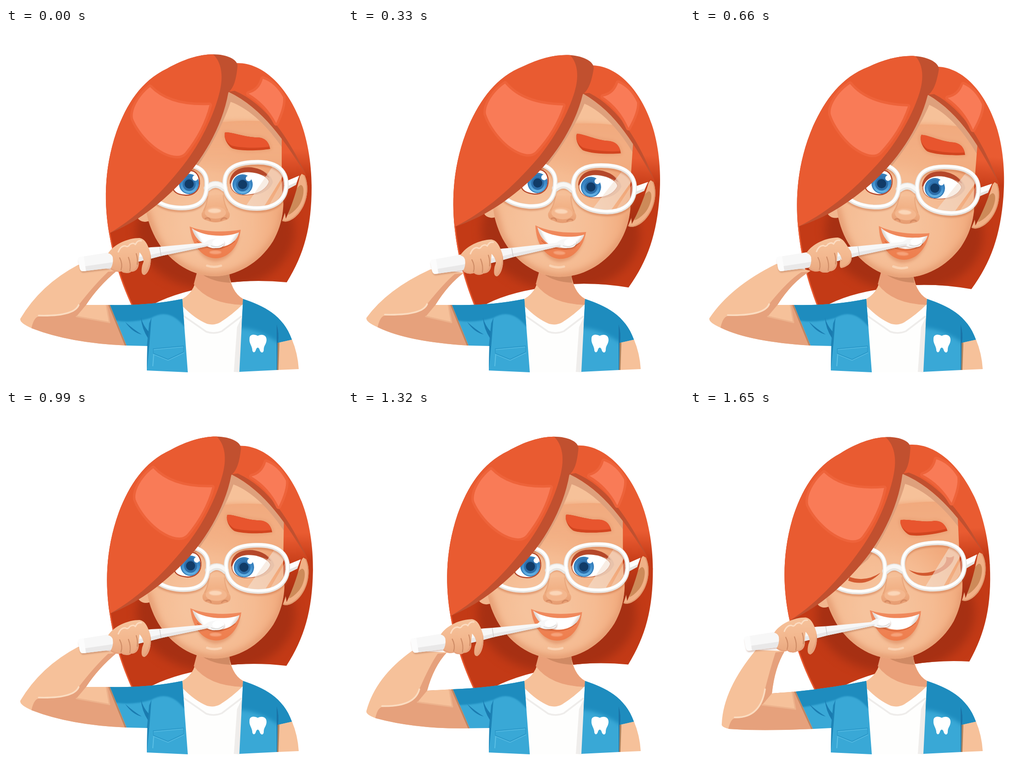
An HTML page with a canvas that plays this animation: 730x767 px, repeating every 1.98 s.

```html
<!DOCTYPE html>
<html lang="en">
<head>
<meta charset="utf-8">
<title>Brushing teeth</title>
<style>
html, body { margin: 0; width: 100%; height: 100%; overflow: hidden; background: #fff; }
canvas { display: block; width: 730px; height: 767px; }
</style>
</head>
<body>
<canvas id="stage" width="730" height="767"></canvas>
<script>
const ctx = document.getElementById('stage').getContext('2d');
const STEP = 330;
const SKIN = '#f6c19a', SKIN_DARK = '#e6a17c', HAIR = '#e95b31', HAIR_DARK = '#c1502f';
const HAIR_BACK = '#c33a16', HAIR_LIGHT = '#f97b57', BLUE = '#39a8d6', BLUE_DARK = '#1e8cbe';

function fill(d, color) {
  ctx.fillStyle = color;
  ctx.fill(new Path2D(d));
}

function line(d, color, width) {
  ctx.strokeStyle = color;
  ctx.lineWidth = width;
  ctx.lineCap = ctx.lineJoin = 'round';
  ctx.stroke(new Path2D(d));
}

function oval(x, y, rx, ry, color, turn = 0) {
  ctx.fillStyle = color;
  ctx.beginPath();
  ctx.ellipse(x, y, rx, ry, turn, 0, Math.PI * 2);
  ctx.fill();
}

function addStops(g, stops) {
  stops.forEach((c, i) => g.addColorStop(i / (stops.length - 1), c));
  return g;
}
const linear = (x0, y0, x1, y1, ...stops) => addStops(ctx.createLinearGradient(x0, y0, x1, y1), stops);
const radial = (x, y, r0, r1, ...stops) => addStops(ctx.createRadialGradient(x, y, r0, x, y, r1), stops);

function group(draw) {
  ctx.save();
  draw();
  ctx.restore();
}

function clipped(d, draw) {
  group(() => { ctx.clip(new Path2D(d)); draw(); });
}

function soft(px, draw) {
  group(() => { ctx.filter = `blur(${px}px)`; draw(); });
}

// Turn around a pivot, then move the pivot to (x, y).
function place(px, py, x, y, deg) {
  ctx.translate(x, y);
  ctx.rotate(deg * Math.PI / 180);
  ctx.translate(-px, -py);
}

// arm: wrist, outer bend, elbow, underside, crook, inner bend, wrist, inner fold (x, y each)
const armOut = [157,513, 75,556, 31,630, 140,683, 174,600, 200,560, 242,525, 158,600];
const armIn = [179,523, 85,566, 40,628, 130,680, 190,600, 218,555, 252,530, 172,598];
const armFar = [188,511, 88,560, 42,629, 130,680, 190,600, 222,550, 262,526, 172,598];
const armBack = [139,522, 60,578, 40,652, 150,692, 172,608, 186,556, 215,525, 155,605];
const armDown = [143,520, 72,605, 69,680, 150,696, 178,614, 184,558, 206,522, 163,605];

// head: pivot x, y, degrees; hand: dx, dy, degrees; lift: drop of the cuff
const poses = [
  { head: [535, 396, 0], hand: [0, 0, 0], arm: armOut, lift: 0, curl: 0 },
  { head: [545, 402.7, 3.8], hand: [22, 3, -1.2], arm: armIn, lift: 0, curl: 0 },
  { head: [548.5, 405.5, 4.4], hand: [31, -1, -.3], arm: armFar, lift: 0, curl: 14 },
  { head: [537, 398, 1], hand: [0, 0, 0], arm: armOut, lift: 0, curl: 0 },
  { head: [533.5, 396.6, -.15], hand: [-20.5, -1.8, -.2], arm: armBack, lift: 5, curl: 0 },
  { head: [525, 393.5, -2.6], hand: [-39, -5.5, 0], arm: armDown, lift: 10, curl: 0, shut: true }
];

function drawBackHair() {
  const d = 'M224,445 C232,490 245,545 283,622 Q325,588 405,568 Q500,540 610,551 ' +
    'C648,490 664,430 664,345 C655,230 580,140 500,130 L300,200Z';
  fill(d, HAIR_BACK);
  clipped(d, () => {
    soft(10, () => oval(455, 440, 172, 128, '#a63013'));
    line('M224,445 C232,490 245,545 283,622', HAIR, 5);
  });
}

function drawArm({ arm, lift }) {
  const [wx, wy, mx, my, ex, ey, dx, dy, cx, cy, ix, iy, vx, vy, kx, ky] = arm;
  const tx = 226 + lift * .4, ty = 600 + lift;
  const ux = 262 + lift * .5, uy = 688 + lift * .3;
  const bx = ex + 26 - lift, by = ey + 21 - lift;
  const hx = ex + 40 - lift * 1.2, hy = ey - 7 - lift * .7;
  const outline = `M${wx},${wy} Q${mx},${my} ${ex},${ey} Q${ex - 2},${ey + 9 - lift * .2} ${bx},${by} ` +
    `Q${dx},${dy} ${ux},${uy} L${tx},${ty} L${cx},${cy} Q${ix},${iy} ${vx},${vy}Z`;
  const fold = `Q${kx - 10},${hy + 2} ${kx},${ky}`;
  fill(outline, SKIN);
  clipped(outline, () => {
    fill(`M${bx - 3},${by + 6} Q${bx + 2},${hy + 4} ${hx},${hy + 2} ${fold} ` +
      `Q${ix - 8},${iy - 4} ${vx - 20},${vy + 3} L${vx + 20},${vy} L${cx + 20},${cy} L300,600 L300,710 L${bx},710Z`, SKIN_DARK);
    line(`M${hx},${hy} ${fold}`, '#fbdcc0', 3.5);
    fill(`M${cx - 21},${cy + 25} L${cx},${cy} L${tx - 8},${ty} L${tx - 1},${ty + 38}Z`, SKIN);
    line(`M${cx - 21},${cy + 25} L${tx - 1},${ty + 38} L${tx - 8},${ty}`, '#edb28c', 3);
    line(`M${tx},${ty} L${ux},${uy}`, '#bd8562', 7);
  });
}

function drawNeck() {
  fill('M416,520 Q415,570 383,587 L380,625 L450,650 L517,610 L515,587 Q488,572 483,520Z', SKIN);
  fill('M416,525 L483,525 Q488,572 515,587 L515,600 Q440,598 408,555Z', '#eaa079');
  fill('M428,535 L485,530 L487,552 Q450,550 428,535Z', '#d08a64');
}

function drawShirt() {
  fill('M383,602 Q410,630 437,641 Q452,645 465,638 Q492,621 515,598 L508,746 L394,746Z', '#fefefd');
  line('M386,624 L435,658 Q452,664 469,657 L511,625', '#eeecea', 3.5);
  fill('M513,625 L502,648 L495,745 L508,746Z', '#efedeb');
}

function drawJacket({ lift }) {
  const tx = 226 + lift * .4, ty = 600 + lift;
  const ux = 262 + lift * .5, uy = 688 + lift * .3;
  const left = `M${tx},${ty} Q310,602 383,587 L395,746 L306,742 L307,689 L${ux},${uy}Z`;
  fill(left, BLUE);
  clipped(left, () => {
    soft(1.5, () => fill(`M${tx - 5},${ty - 5} L310,590 L390,580 L388,648 Q355,605 316,628 Q275,640 ${tx + 12},${ty + 34}Z`, BLUE_DARK));
    fill('M316,628 L312,680 L306,742 L304,742 L306,690 L311,640Z', '#1d83b6');
  });
  fill('M259,637 Q278,654 295,664 Q275,660 259,637Z M293,627 Q295,652 309,673 L310,658 Q298,645 293,627Z', '#1a7bb0');
  line('M319,732 L321,706', '#5bbfe5', 2);
  line('M320,697 L386,691 L386,704 L352,720 L320,707Z', '#55bae2', 1.5);
  line('M320,695 L386,689 L386,702 L352,718 L320,705Z', '#2896c7', 1.5);

  fill('M589,680 L621,674 Q634,705 636,739 L589,741Z', SKIN);
  fill('M588,680 L594,680 L592,741 L588,741Z', '#a9825f');
  const right = 'M515,587 C560,602 602,622 621,675 L590,682 L589,741 L507,745Z';
  fill(right, BLUE);
  clipped(right, () => {
    soft(4, () => fill('M505,580 L640,580 L640,684 L590,681 Q545,650 505,650Z', BLUE_DARK));
    fill('M588,640 L625,640 L625,684 L590,682Z', BLUE_DARK);
    fill('M588,642 Q594,662 591,682 L590,742 L588,742Z', '#1a73a7');
  });
  fill('M529,673 C529,663 540,663 547,667 C556,662 567,665 566,677 C565,686 560,688 560,697 ' +
    'C560,705 553,705 551,697 C549,691 545,691 543,697 C541,705 535,704 535,696 C534,688 528,683 529,673Z', '#fff');
}

function drawFace() {
  oval(302, 405, 18, 15, '#f1b68e');
  const ear = 'M645,312 C660,335 658,375 636,402 C622,418 608,422 600,418 L606,400 Q625,360 636,325Z';
  fill(ear, '#f0b086');
  clipped(ear, () => line('M645,312 C660,335 658,375 636,402 C622,418 608,422 600,418', '#e29a70', 5));
  fill('M640,340 C651,341 647,372 634,388 Q622,402 613,405 Q622,350 640,340Z', '#cd8a59');

  const d = 'M470,125 L560,140 L602,215 L600,330 C606,380 604,420 580,462 C550,510 500,538 452,538 ' +
    'C395,536 350,500 325,455 C312,430 306,410 303,385 L340,330Z';
  fill(d, radial(425, 425, 40, 185, '#f6c39d', '#f5bb92', '#f1a87a'));
  clipped(d, () => {
    fill('M400,120 L610,120 L610,210 Q530,190 400,215Z', '#f6c199');
    soft(4, () => fill('M400,210 Q520,190 612,212 L612,310 L380,310Z', linear(0, 200, 0, 310, '#f1aa7e', '#f2ae83', 'rgba(244,182,140,0)')));
    soft(7, () => line('M603,400 C600,430 592,446 580,462 C550,510 500,538 452,538 C395,536 350,500 325,455 L305,400', '#e49a70', 14));
    fill('M470,110 L610,110 L602,262 C570,215 530,175 488,160 C470,215 430,285 400,320 L360,350 L430,230Z', '#dea07c');
  });
  fill('M599,225 L599,330 Q600,370 608,413 Q628,370 640,315 L655,322Z', linear(0, 270, 0, 400, HAIR, '#c33a16', '#a63013'));
}

function drawNose() {
  fill('M440,362 Q434,385 425,402 Q424,415 437,417 Q455,425 474,417 Q488,415 486,402 Q476,385 472,360Z', linear(0, 360, 0, 422, 'rgba(240,170,125,.1)', '#f1b084', '#e69b70'));
  oval(455, 400, 23, 13, '#f4b78e');
  line('M438,365 Q436,384 430,395 M472,363 Q474,382 481,394', 'rgba(218,143,102,.35)', 2.5);
  line('M433,413 Q440,409 444,416 M467,416 Q473,409 479,413', '#d58a62', 3);
  soft(1, () => oval(453, 396, 14, 5, '#fbd6b8'));
}

function drawMouth() {
  soft(3, () => fill('M405,445 Q415,502 455,506 Q495,502 507,450Z', 'rgba(214,125,80,.5)'));
  const lips = 'M399,430 C430,443 475,443 510,437 C506,470 486,499 455,499 C424,498 403,468 399,430Z';
  fill(lips, linear(0, 430, 0, 500, '#f08b5f', '#ee7d4c'));
  const teeth = 'M404,434 C430,453 480,454 506,443 C502,461 485,474 460,475 C432,475 412,460 404,434Z';
  fill(teeth, '#fff');
  clipped(teeth, () => {
    soft(2, () => line('M401,431 L424,470 M510,441 L490,470', '#ddd6d0', 8));
  });
  line('M415,462 Q433,478 460,478 Q482,476 497,462', '#dc683b', 2);
  soft(1, () => oval(455, 486, 13, 4, '#f6a27a'));
  line('M437,515 Q452,520 467,515', '#fad2b2', 5);
}

function iris(x, y) {
  oval(x, y, 22, 22, '#367fbc');
  oval(x, y + 1, 19, 19, linear(0, y - 18, 0, y + 18, '#2f71ae', '#3f8fcd', '#65b2e4'));
  oval(x, y + 1, 14, 14, '#2c6eaa');
  oval(x, y, 10, 10, '#113b67');
  oval(x + 13, y - 13, 6, 6, '#fff');
}

function drawEyes(shut) {
  if (shut) {
    fill('M487,346 C508,358 537,358 560,343 Q572,334 570,322 Q579,326 587,321 Q587,335 568,348 C540,366 508,366 487,346Z', '#d2592f');
    fill('M358,356 Q392,370 426,350 Q394,381 355,364Z', '#d2592f');
    return;
  }
  fill('M486,338 C485,306 522,296 553,307 Q576,316 580,334 Q573,354 545,361 L515,363 Q488,360 486,338Z', '#d9936f');
  fill('M486,338 C485,304 522,294 553,307 Q566,313 573,325 Q550,312 520,313Z', '#b5472a');
  const right = 'M489,337 C495,313 520,309 545,315 C560,319 570,327 571,333 C565,350 545,362 515,361 C498,360 488,350 489,337Z';
  line(right, '#b9593b', 2);
  fill(right, '#fff');
  clipped(right, () => iris(514, 339));
  const left = 'M365,350 C378,299 421,300 419,337 C418,355 402,362 390,361 C375,360 368,356 365,350Z';
  line(left, '#b5472a', 5);
  fill(left, '#fff');
  clipped(left, () => iris(398, 338));
}

function drawBrow(shut) {
  group(() => {
    if (shut) place(525, 244, 525, 252, -4.6);
    const d = 'M476,226 C490,225 520,237 545,237 C562,237 572,248 574,262 C550,266 510,267 492,261 C480,254 472,236 476,226Z';
    soft(3, () => line(d, 'rgba(215,125,80,.4)', 4));
    fill(d, '#d2451f');
    fill('M476,226 C490,225 520,237 545,237 C562,237 570,246 572,257 C548,261 510,260 491,255 C480,249 472,236 476,226Z', '#e8552e');
  });
}

function drawGlasses() {
  const lens = 'M475,338 C474,303 502,292 540,291 C582,289 610,304 609,342 C607,376 580,391 545,391 C505,391 477,375 475,338Z';
  const other = 'M436,338 C437,306 412,296 375,294 C335,294 308,306 308,340 C310,375 345,390 383,390 C420,389 437,375 436,338Z';
  const bridge = 'M437,347 Q455,331 474,347';
  clipped(lens, () => {
    fill('M582,296 L602,320 L556,394 L518,390Z', 'rgba(243,226,210,.6)');
    fill('M606,322 L614,336 L576,394 L566,394Z', 'rgba(243,226,210,.35)');
  });
  const frame = lens + other;
  group(() => {
    ctx.translate(0, 5);
    soft(1.5, () => line(frame + bridge, 'rgba(196,104,58,.38)', 9));
  });
  fill('M611,331 L637,320 L630,340 L613,349Z', '#e6e3df');
  fill('M611,331 L637,320 L631,334 L613,342Z', '#fefefd');
  line(bridge, '#e8e5e1', 15);
  line(frame, '#e8e5e1', 10);
  group(() => {
    ctx.translate(0, -1.5);
    line(bridge, '#f8f7f5', 8);
    line(frame, '#fefefd', 6);
  });
}

function shine(d) {
  line(d, '#ee633a', 11);
  fill(d, HAIR_LIGHT);
}

function drawFrontHair() {
  fill('M500,76 C557,74 608,125 637,195 C654,236 664,290 664,345 L652,318 C605,245 560,175 483,138 Q500,110 500,76Z', linear(0, 262, 0, 322, HAIR, HAIR_BACK));
  fill('M652,318 C605,245 560,175 483,138 L497,136 C565,165 612,235 652,318Z', HAIR_DARK);
  shine('M558,110 Q585,119 602,150 Q604,170 587,206 Q565,164 527,142 Q551,136 558,110Z');

  const edge = 'C500,115 494,130 483,140 C470,215 425,290 375,340 C330,385 285,420 224,445';
  const outer = 'C214,385 211,310 240,225 C262,165 293,115 350,88 C385,68 420,57 450,57';
  fill(`M224,445 ${outer} C480,57 503,68 503,82 ${edge}Z`, HAIR_DARK);
  const lock = `M224,445 ${outer} C469,75 472,105 465,135 C455,180 428,240 393,287 C347,348 290,407 224,445Z`;
  fill(lock, HAIR);
  clipped(lock, () => {
    shine('M313,128 Q354,171 442,167 Q428,222 389,270 Q379,281 358,275 C318,263 285,220 276,196 C272,174 293,143 313,128Z');
  });
}

function drawHand({ hand, curl }) {
  const [dx, dy, deg] = hand;
  group(() => {
    place(300, 490, 300 + dx, 490 + dy, deg);
    const brush = 'M162,496 L225,486 L315,475 L334,474 L432,465 Q440,457 457,456 Q476,456 474,468 Q471,478 455,477 ' +
      'Q446,478 437,473 L337,494 L314,500 L234,519 L168,527 Q162,528 160,520 L157,503 Q156,497 162,496Z';
    group(() => {
      ctx.translate(1, 3);
      soft(1.5, () => fill(brush, 'rgba(130,60,30,.28)'));
    });
    fill(brush, '#f7f7f7');
    clipped(brush, () => {
      fill('M160,518 L235,507 L316,491 L338,486 L440,469 L440,485 L300,515 L160,535Z', '#e9e8e8');
      fill('M155,494 L169,495 L174,528 L155,528Z', '#fcfcfc');
      oval(461, 464, 13, 8, '#fff', -.15);
      line('M446,472 Q460,478 472,468', '#dedcda', 2);
    });
    line('M334,475 L337,494', '#c9c8c8', 1.2);

    const tip = 535 - curl, out = 314 + curl * .4;
    const d = `M222,488 C235,468 265,455 290,455 C303,457 308,470 ${out - 1},485 C${out + 4},505 ${out - 2},${tip - 5} ${301 - curl * .2},${tip} ` +
      `C293,${tip} 294,${tip - 11} 296,${tip - 21} L299,506 Q298,494 290,486 L288,506 C290,518 284,528 272,528 C268,532 255,532 251,527 ` +
      'C242,530 232,527 227,522 Q234,511 232,497 Q230,490 222,488Z';
    fill(d, linear(0, 455, 0, 535, '#f6c39c', '#f3b88f', '#e7a57d'));
    clipped(d, () => {
      line(`M${out + 2},490 Q${out + 2},515 ${301 - curl * .2},${tip}`, SKIN_DARK, 5);
      line('M228,522 Q243,531 251,527 Q262,533 272,528 Q284,528 288,508', SKIN_DARK, 4);
    });
    line('M247,498 Q254,511 250,524 M266,497 Q272,512 269,526 M283,489 Q287,501 285,512', '#cf8c66', 2.2);
    line('M244,485 Q249,472 259,472 Q265,476 269,469 Q277,464 281,469 Q286,459 294,461', '#fcdcc1', 3);
  });
}

function drawScene(p) {
  const atHead = draw => group(() => { place(535, 396, ...p.head); draw(); });
  ctx.fillStyle = '#fff';
  ctx.fillRect(0, 0, 730, 767);
  atHead(drawBackHair);
  drawArm(p);
  drawNeck();
  drawShirt();
  drawJacket(p);
  atHead(() => {
    drawFace();
    drawNose();
    drawMouth();
    drawEyes(p.shut);
    drawBrow(p.shut);
    drawGlasses();
    drawFrontHair();
  });
  drawHand(p);
}

const start = performance.now();
let shown = -1;

function tick() {
  const now = Math.floor((performance.now() - start) / STEP) % poses.length;
  if (now !== shown) {
    shown = now;
    drawScene(poses[now]);
  }
  requestAnimationFrame(tick);
}
tick();
</script>
</body>
</html>
```
